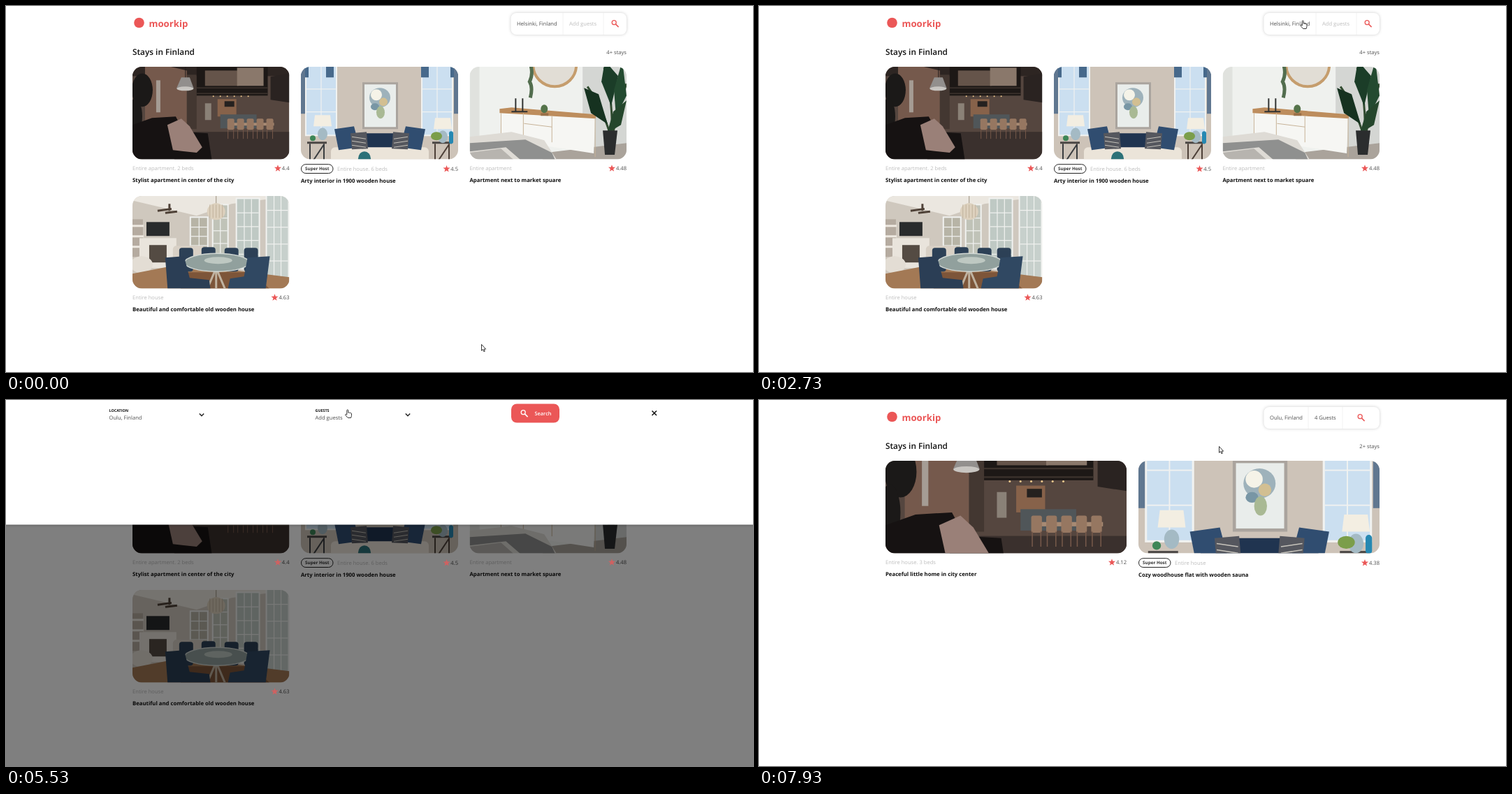
Write an HTML page that moves like this. It is 1069 px wide and 524 px high and loops after 8 s.

```html
<!DOCTYPE html>
<html lang="en">
<head>
<meta charset="utf-8">
<title>Stays in Finland</title>
<style>
html, body { margin: 0; height: 100%; overflow: hidden; background: #fff; }
svg { display: block; }
text { font-family: "Open Sans", Lato, sans-serif; text-rendering: geometricPrecision; }
</style>
</head>
<body>
<svg id="stage" width="1069" height="524" viewBox="0 0 1069 524"></svg>
<script>
const RED = '#eb5757', GREY = '#bdbdbd', INK = '#4f4f4f', DARK = '#111';

const rect = (fill, x, y, w, h, rx = 0, extra = '') =>
  `<rect x="${x}" y="${y}" width="${w}" height="${h}" rx="${rx}" fill="${fill}" ${extra}/>`;
const oval = (fill, x, y, rx, ry = rx, extra = '') =>
  `<ellipse cx="${x}" cy="${y}" rx="${rx}" ry="${ry}" fill="${fill}" ${extra}/>`;
const poly = (fill, points) => `<polygon points="${points}" fill="${fill}"/>`;
const line = (d, color, width = 1, id = '') =>
  `<path id="${id}" d="${d}" fill="none" stroke="${color}" stroke-width="${width}"/>`;
const text = (x, y, s, { size = 7.6, weight = 400, fill = INK, anchor = 'start', id = '' } = {}) =>
  `<text id="${id}" x="${x}" y="${y}" font-size="${size}" font-weight="${weight}" fill="${fill}" text-anchor="${anchor}">${s}</text>`;
const bold = (x, y, s, size = 7.75) => text(x, y, s, { size, weight: 700, fill: DARK });
const group = (id, body) => `<g id="${id}">${body}</g>`;
const repeat = (n, f) => Array.from({ length: n }, (_, i) => f(i)).join('');

// Simplified room pictures, each 225 x 150
const sash = (x, y, w, h, glass, cols, rows) => rect('#f1f2f0', x - 2, y - 2, w + 4, h + 4) + rect(glass, x, y, w, h) +
  repeat(cols - 1, i => rect('#f1f2f0', x + w * (i + 1) / cols - .6, y, 1.2, h)) +
  repeat(rows - 1, i => rect('#f1f2f0', x, y + h * (i + 1) / rows - .6, w, 1.2));

const rooms = {
  loft: rect('#55463f', 0, 0, 225, 150) + rect('#2d2522', 0, 0, 225, 22) +
    poly('#75594c', '18,0 78,14 78,94 18,104') + rect('#a59c94', 34, 28, 6, 46) + rect('#433731', 78, 20, 14, 78) +
    rect('#1d1816', 92, 9, 102, 41) + rect('#65544a', 104, 14, 48, 22) + rect('#8a786b', 150, 10, 38, 26) +
    line('M92,39H194M92,47H194', '#3c322d', 1.5) +
    repeat(6, i => oval('#f0c98d', 116 + i * 10, 51, 1)) +
    rect('#8a8177', 104, 61, 9, 24) + rect('#87624a', 122, 55, 27, 25) + rect('#25211f', 132, 58, 14, 8) +
    rect('#505659', 126, 77, 52, 20) + poly('#2a2321', '198,23 225,18 225,60 198,56') +
    rect('#3a302d', 60, 102, 165, 48) + rect('#a78a73', 139, 89, 64, 4) +
    repeat(5, i => rect('#967761', 136 + i * 14, 83, 10, 16, 2) + line(`M${137 + i * 14},98v14m8,-14v14`, '#76594a', 1)) +
    line('M76,0V30', '#24201e', 1) + poly('#928f8d', '70,24 82,24 88,40 63,40') + oval('#c8c5c1', 75.5, 40, 12, 3) +
    oval('#1b1918', 14, 42, 15, 24) + oval('#1b1918', 4, 80, 10, 26) +
    poly('#161212', '0,92 28,82 62,80 74,102 108,104 115,150 0,150') + poly('#9a8078', '50,92 70,83 82,94 100,124 92,132 58,128'),

  lounge: rect('#cdc3b8', 0, 0, 225, 150) +
    sash(8, 8, 42, 98, '#cbdff0', 2, 3) + sash(174, 8, 42, 98, '#cbdff0', 2, 3) +
    [0, 36, 172, 214].map(x => rect('#47698b', x, 0, 11, 24)).join('') + rect('#607790', 0, 0, 6, 76) + rect('#607790', 219, 0, 6, 76) +
    rect('#aaa49e', 88, 31, 51, 67) + rect('#e9edeb', 91, 34, 45, 61) +
    oval('#9eb2bb', 113, 53, 15, 14) + oval('#f5f3e8', 108, 49, 8) + oval('#d2bf92', 118, 59, 6) +
    oval('#7896a5', 106, 66, 6, 5) + oval('#a9b994', 114, 74, 6, 9) +
    rect('#203450', 58, 104, 110, 25, 4) + rect('#ebe4d9', 43, 124, 140, 26, 6) +
    poly('#304d70', '48,98 76,94 84,124 54,128') + poly('#304d70', '178,98 150,94 142,124 172,128') +
    poly('#55575e', '71,104 94,102 96,126 73,127') + poly('#55575e', '155,104 132,102 130,126 153,127') +
    repeat(3, i => line(`M73,${109 + i * 6}l20,3m40,0l20,-3`, '#c6c3bb', 1)) +
    rect('#4b4745', 9, 116, 28, 3) + line('M13,119V150M33,119V150M13,150L33,120', '#3a3d40', 2) +
    rect('#4b4745', 188, 116, 28, 3) + line('M192,119V150M212,119V150M192,150L212,120', '#4d4038', 2) +
    [[18, 78], [190, 82]].map(([x, y]) => poly('#f3eee2', `${x + 2},${y} ${x + 24},${y} ${x + 26},${y + 16} ${x},${y + 16}`) +
      oval('#a4bac4', x + 13, y + 27, 7, 9)).join('') +
    oval('#7b9e4a', 194, 108, 8, 6) + rect('#2688b2', 212, 101, 6, 18, 3) +
    oval('#3d8657', 17, 111, 4) + oval('#2c7178', 91, 140, 9, 10),

  bedroom: rect('#eff1ee', 0, 0, 225, 150) + rect('#d4d6d3', 162, 0, 63, 125) + rect('#e0e2de', 0, 0, 14, 120) +
    poly('#aaa39b', '110,132 225,118 225,150 100,150') +
    oval('#e1ddd5', 122, 6, 31, 31, 'stroke="#c59d6d" stroke-width="4"') +
    line('M88,8q3,12 -2,22q5,8 1,23', '#526d4e', 5) +
    poly('#f6f6f3', '43,72 180,82 178,133 45,112') + poly('#bd8d5d', '43,69 60,67 181,77 181,83 43,75') +
    line('M180,82V138M45,75V116M77,75V111M118,79V117M78,90L118,95', '#c7b398', 1) +
    line('M60,73H83M66,73V54M76,73V54', '#303231', 2) + oval('#54734a', 107, 69, 5, 6) + rect('#9a7048', 102, 75, 11, 4) +
    line('M204,113Q206,55 193,10M204,113Q190,66 169,37M204,113Q212,67 225,33', '#314b30', 3) +
    poly('#1b3d28', '194,0 213,22 203,65 189,30') + poly('#234a30', '219,0 225,50 210,80 207,42') +
    poly('#163220', '164,39 185,48 198,91 174,75') + poly('#25462c', '225,57 206,73 197,104 217,92') +
    poly('#2b2d2e', '191,100 212,100 208,135 194,135') +
    poly('#dedbd5', '0,109 60,102 107,114 130,150 0,150') + poly('#8f908f', '0,118 80,113 118,132 126,150 82,150 52,124 0,130') +
    poly('#b7b4af', '0,132 45,126 72,150 0,150'),

  dining: rect('#cfc8be', 0, 0, 225, 150) + poly('#ebe7e0', '0,0 225,0 225,9 142,20 92,37 0,15') +
    rect('#b5aba0', 0, 42, 15, 54) + repeat(3, i => rect('#eee9e1', 0, 50 + i * 15, 16, 3)) +
    sash(84, 40, 23, 53, '#b7b4a6', 2, 4) + sash(116, 22, 20, 73, '#c0c3b8', 2, 4) +
    sash(150, 13, 31, 99, '#bfc9c4', 3, 5) + sash(193, 5, 30, 121, '#c7d0cc', 3, 5) +
    rect('#e9e4dc', 10, 69, 53, 43) + rect('#544b43', 24, 79, 25, 25) + rect('#292b2c', 20, 46, 33, 20) +
    oval('#e3ddd4', 13, 107, 16, 12) + rect('#d8d0c5', 58, 80, 45, 26, 5) +
    poly('#a37955', '0,120 72,106 225,125 225,150 0,150') + poly('#7d5539', '80,118 172,118 205,150 65,150') +
    line('M36,30L56,27M47,33L64,31M53,20V30', '#4f4238', 3) +
    line('M120,8V20', '#9d9280', 1) + oval('#ddd1be', 120, 31, 13, 12) + repeat(5, i => line(`M${111 + i * 4.5},21v19`, '#b9aa94', .8)) +
    [[67, 83], [99, 82], [132, 83], [160, 83]].map(([x, y]) => rect('#2c4056', x, y, 20, 34, 4)).join('') +
    line('M120,112L106,145M120,112L134,145M120,112V148', '#bfb2a0', 3) +
    oval('#91a09d', 121, 104, 46, 13, 'stroke="#d2d8d4" stroke-width="1.5"') + oval('#bec8c2', 123, 101, 20, 5) +
    poly('#2b3e55', '47,97 74,95 82,126 110,129 113,150 51,150') + poly('#304862', '165,97 197,95 190,150 135,150 140,127 160,124')
};

const defs = Object.entries(rooms).map(([id, body]) =>
  `<symbol id="${id}" viewBox="0 0 225 150" preserveAspectRatio="xMidYMid slice">${body}</symbol>`).join('');

const star = (x, y) => poly(RED, repeat(10, i => {
  const r = i % 2 ? 2.2 : 5.3, a = i * Math.PI / 5;
  return `${(x + r * Math.sin(a)).toFixed(2)},${(y - r * Math.cos(a)).toFixed(2)} `;
}));
const glass = (x, y, color) => line(`M${x + 1.6},${y + 1.6}l4,4`, color, 1.5) +
  oval('none', x - .8, y - .8, 3, 3, `stroke="${color}" stroke-width="1.3"`);

function card([x, y, w, room, kind, title, rating, host]) {
  const clip = `${room}${w}`, drop = host ? 1 : 0;
  return `<clipPath id="${clip}">${rect('#000', x, y, w, 132.5, 13.5)}</clipPath>
    <g clip-path="url(#${clip})"><use href="#${room}" x="${x}" y="${y}" width="${w}" height="132.5"/></g>` +
    (host ? rect('#fff', x + .5, y + 139.7, 45.5, 12.8, 6.4, 'class="pill" stroke="#222"') +
      text(x + 23.3, y + 148.4, 'Super Host', { size: 6.3, weight: 700, fill: '#333', anchor: 'middle' }) : '') +
    text(x + (host ? 52 : 0), y + 148 + drop, kind, { fill: GREY }) +
    text(x + w, y + 148 + drop, rating, { anchor: 'end' }) +
    bold(x, y + 164.5 + drop * 1.5, title);
}
const cardStar = ([x, y, w, , , , rating, host]) => star(x + w - 3 - rating.length * 4.5, y + 145.5 + (host ? .7 : 0));

const before = [
  [181, 87, 224.5, 'loft', 'Entire apartment. 2 beds', 'Stylist apartment in center of the city', '4.4'],
  [422, 87, 225, 'lounge', 'Entire house. 6 beds', 'Arty interior in 1900 wooden house', '4.5', true],
  [663.5, 87, 224.5, 'bedroom', 'Entire apartment', 'Apartment next to market spuare', '4.48'],
  [181, 272, 224.5, 'dining', 'Entire house', 'Beautiful and comfortable old wooden house', '4.63']
];
const after = [
  [181, 87, 345, 'loft', 'Entire house. 3 beds', 'Peaceful little home in city center', '4.12'],
  [543, 87, 345, 'lounge', 'Entire house', 'Cozy woodhouse flat with wooden sauna', '4.38', true]
];

const bar = (place, guests, guestColor, cut1, cut2, icon) =>
  text(731, 28, place) + text(cut1 + 9, 28, guests, { fill: guestColor }) +
  line(`M${cut1},10V41M${cut2},10V41`, '#f2f2f2') + glass(icon, 24.5, RED);

const header = oval(RED, 190.5, 24, 7.3) +
  text(204.5, 30, 'moorkip', { size: 13.2, weight: 700, fill: RED }) +
  text(181, 70.3, 'Stays in Finland', { size: 11.8, weight: 600, fill: DARK }) +
  rect('#fff', 722.5, 10, 165.5, 31, 8, 'style="filter:drop-shadow(0 .5px 2px #0003)"');
const count = n => text(888, 68.6, `${n}+ stays`, { anchor: 'end' });

const button = (x, y, plus, id = '') =>
  `<g id="${id}" stroke="#222">${rect('#fff', x, y, 14, 14, 2)}
  <path d="M${x + 3},${y + 7}h8${plus ? 'm-4,-4v8' : ''}" stroke-width="1.6"/></g>`;
const counter = (y, name, ages, id) => bold(442.5, y, name) +
  text(442.5, y + 10, ages, { fill: GREY }) + button(442.8, y + 20.7, false, id + 'Minus') +
  text(467.3, y + 30.5, '0', { anchor: 'middle', id }) + button(478.3, y + 20.7, true);

const places = ['Helsinki', 'Oulu', 'Turku', 'Vaasa'];
const placeList = places.map((p, i) => {
  const y = 46 + i * 14.5;
  return `<path d="M152.7,${y + 1}q-5.2,-8 0,-8q5.2,0 0,8z" fill="${INK}"/>` +
    oval('#fff', 152.7, y - 4.3, 1) + text(160, y, p + ', Finland');
}).join('');

const panel = rect('#fff', 0, -6, 1069, 184.5, 0, 'style="filter:drop-shadow(0 1px 1.5px #0004)"') +
  bold(147.5, 17.4, 'LOCATION', 5.4) + text(147.5, 28, '', { id: 'place' }) + line('', '#222', 1.5, 'placeArrow') +
  bold(442.5, 17.4, 'GUESTS', 5.4) + text(442.5, 28, '', { id: 'guests' }) + line('', '#222', 1.5, 'guestArrow') +
  rect(RED, 723, 5.5, 69, 27, 8) + glass(741, 18.5, '#fff') +
  text(756.5, 21.6, 'Search', { size: 7.4, weight: 600, fill: '#fff' }) +
  line('M924.5,15.5l6.5,6.5m0,-6.5l-6.5,6.5', '#111', 1.5) +
  group('list', placeList) +
  group('picker', counter(46.3, 'Adults', 'Ages 13 or above', 'adults') + counter(97.6, 'Children', 'Ages 2 - 12', 'children'));

const pointer = `<g id="pointer" fill="#fff" stroke="#222" stroke-width=".9" stroke-linejoin="round">
  <path id="arrow" d="M.5,.5V9.4L2.5,7.6 3.9,10.8 5.3,10.2 4,7.2H6.6Z"/>
  <path id="hand" d="M2.8,8V1.6q1,-1.6 2,0V5.2q.9,-.8 1.7,.2q1,-.6 1.6,.3q1.3,-.2 1.4,1V9.5L8.6,12.5H4.2L.7,8.6q-.2,-1.6 1.2,-1.2z"/></g>`;

document.getElementById('stage').innerHTML = `<defs>${defs}</defs>` + header +
  group('first', bar('Helsinki, Finland', 'Add guests', GREY, 797, 855, 871) + count(4) + before.map(card).join('')) +
  group('second', bar('Oulu, Finland', '4 Guests', INK, 786, 835, 861) + count(2) + after.map(card).join('')) +
  rect('#000', 0, 0, 1069, 524, 0, 'id="shade" opacity=".5"') +
  group('firstStars', before.map(cardStar).join('')) + group('secondStars', after.map(cardStar).join('')) +
  group('panel', panel) + pointer;

// Pointer path: time, x, y
const path = [
  [270, 680, 484], [400, 662, 497], [870, 697, 283], [1130, 809, 206],
  [1330, 740, 117], [1670, 740, 117], [1800, 878, 56], [1870, 774, 150],
  [2070, 774, 150], [2270, 640, 208], [2400, 561, 140], [2730, 774.5, 20],
  [3270, 774.5, 20], [3530, 480, 45], [3730, 225, 16], [4140, 225, 16],
  [4600, 207, 51], [5270, 207, 51], [5530, 485, 13], [5870, 485, 13],
  [6330, 481, 74], [7070, 481, 74], [7330, 736, 17.5], [7540, 736, 17.5], [7930, 658, 66]
];
const clicks = [6530, 6670, 6870, 7070];

function locate(t) {
  const i = path.findIndex(p => p[0] > t);
  if (i < 0) return path.at(-1).slice(1);
  if (!i) return path[0].slice(1);
  const [t0, x0, y0] = path[i - 1], [t1, x1, y1] = path[i], k = (t - t0) / (t1 - t0);
  return [x0 + (x1 - x0) * k, y0 + (y1 - y0) * k];
}

const el = id => document.getElementById(id);
const show = (id, on) => el(id).style.display = on ? '' : 'none';
const chevron = (id, x, up) => el(id).setAttribute('d', up ? `M${x},22.7l3.2,-3.2 3.2,3.2` : `M${x},19.5l3.2,3.2 3.2,-3.2`);
const enable = (id, on) => el(id).setAttribute('stroke', on ? '#222' : '#ddd');

function frame() {
  const t = performance.now() % 8000 + 4;
  const open = t >= 3070 && t < 7600, done = t >= 7600;
  const listOpen = t >= 4000 && t < 5330, pickerOpen = t >= 5870;
  const adults = clicks.filter(c => c <= t).length;

  show('first', !done);
  show('firstStars', !done);
  show('second', done);
  show('secondStars', done);
  show('shade', open);
  show('panel', open);
  show('list', listOpen);
  show('picker', pickerOpen);
  el('firstStars').style.opacity = open ? .75 : 1;
  document.querySelectorAll('.pill').forEach(p => p.setAttribute('fill-opacity', open ? 0 : 1));

  el('place').textContent = places[t < 5330 ? 0 : 1] + ', Finland';
  el('guests').textContent = adults || 'Add guests';
  el('adults').textContent = adults;
  chevron('placeArrow', 276.8, listOpen);
  chevron('guestArrow', 571.8, pickerOpen);
  enable('adultsMinus', adults > 0);
  enable('childrenMinus', false);

  // The pointer is sampled 15 times a second
  const [x, y] = locate(Math.floor(t * .015) / .015 + 3);
  const hand = open || (y < 42 && x > 720);
  show('hand', hand);
  show('arrow', !hand);
  el('pointer').setAttribute('transform', `translate(${x} ${y})`);
  requestAnimationFrame(frame);
}
frame();
</script>
</body>
</html>
```
